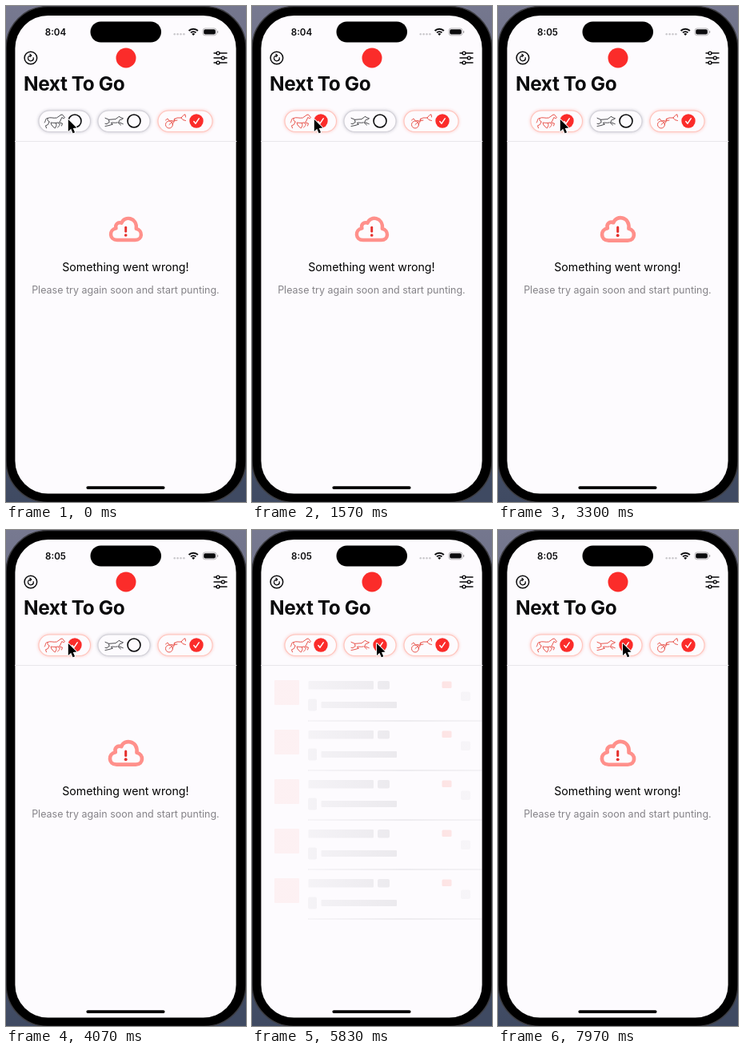
An HTML page with a canvas that plays this animation: 300 px wide and 621 px high, repeating every 8 s.

```html
<!DOCTYPE html>
<html lang="en">
<head>
<meta charset="utf-8">
<title>Next To Go</title>
<style>
  html, body { margin: 0; width: 100%; height: 100%; overflow: hidden; background: #2c2e3b; }
  canvas { display: block; width: 300px; height: 621px; }
</style>
</head>
<body>
<canvas id="stage"></canvas>
<script>
const W = 300, H = 621, LOOP = 8000;
const RED = '#fb2c2a', INK = '#0b0b0d', PAPER = '#fdfbfe';
const FONT = 'Inter, "Liberation Sans", sans-serif';

const canvas = document.getElementById('stage');
const ctx = canvas.getContext('2d');
const dpr = window.devicePixelRatio || 1;
canvas.width = W * dpr;
canvas.height = H * dpr;

// Each load: tap on a chip, then the error comes back.
const loads = [
  { tap: 300, back: 985, shineX: 60, shineAt: 1100, icon: [28.5, 196, 23, 24], tag: [232, 189, 17, 6] },
  { tap: 5150, back: 6000, shineX: 190, shineAt: 5830, icon: [28, 188, 31, 31], tag: [237.5, 189.5, 12, 8.5] }
];

const cloud = new Path2D('M138.5 293.5H162C172 293.5 172 280.5 163.3 278.8C165 263.5 147.5 261.5 144.3 271.3C139 269.5 135.5 273.5 137 278.3C127.5 280 128 293.5 138.5 293.5Z');
const icons = {
  horse: new Path2D('M4 5C7 3 11 5.5 15.5 4.5L20 1.2L22.3 .3L25.5 4.3L24.3 5.3L21.8 4L19.8 8.5L18.5 10.5L22.5 11.5L21.5 14.5M17.5 10.8L19.5 13.5L16.5 16.5M17 10.5C13 11.5 10 10.5 8 10.5L9 13.5L12.5 17.3M6 9.5L4.5 13L1.5 14.3L2.5 17.3M4 5C1 4.5 2 8 .3 10.5M4 5C3.2 7 4.5 8.5 6 9.5M14.5 11L15 14L13.5 17.3'),
  dog: new Path2D('M.5 2.8L5 4.8L13.5 4.2L17 1.5L18.5 .8L19.2 2L23 3.2L21.8 4.4L18.6 5L17.2 8L22.8 10.2M16.5 8.5L20 11.5M15.5 8.5C12 9.5 9 7.5 7.5 9L10 10.5L5.5 12L.5 13M5.5 8L2.5 10.2L.5 9.8M5 4.8L5.5 8'),
  trot: new Path2D('M9.5 13A4.5 4.5 0 1 1 .5 13A4.5 4.5 0 1 1 9.5 13M5 13L10 8.5L15 7.5M.5 7.5L3 5.5L5.5 8.5L9 8M11 6.5L15 4.5L20 4.5L23 1L25 .3L25.5 3.5M20 4.5L22 7L25.5 8M12 5.5L11 9.5L9 12.5')
};
const chips = [
  { x: 41, w: 64.5, icon: 'horse', ix: 48, iy: 135.5, cx: 86, on: t => t >= loads[0].tap },
  { x: 115, w: 65, icon: 'dog', ix: 123.5, iy: 137.5, cx: 160, on: t => t >= loads[1].tap },
  { x: 190, w: 68, icon: 'trot', ix: 199, iy: 135.5, cx: 238, on: () => true }
];

const clamp = v => Math.max(0, Math.min(1, v));
const ease = v => { v = clamp(v); return v * v * (3 - 2 * v); };

function box(x, y, w, h, r, fill) {
  ctx.beginPath();
  ctx.roundRect(x, y, w, h, r);
  if (fill) { ctx.fillStyle = fill; ctx.fill(); }
}

function disc(x, y, r, fill) {
  ctx.beginPath();
  ctx.arc(x, y, r, 0, Math.PI * 2);
  if (fill) { ctx.fillStyle = fill; ctx.fill(); }
}

function line(color, width, ...pts) {
  ctx.beginPath();
  for (let i = 0; i < pts.length; i += 2) ctx.lineTo(pts[i], pts[i + 1]);
  ctx.strokeStyle = color;
  ctx.lineWidth = width;
  ctx.stroke();
}

function text(str, x, y, size, weight, color, align, spacing) {
  ctx.font = `${weight} ${size}px ${FONT}`;
  ctx.letterSpacing = spacing || '0px';
  ctx.textAlign = align || 'left';
  ctx.fillStyle = color;
  ctx.fillText(str, x, y);
}

function drawPhone() {
  const bg = ctx.createLinearGradient(0, 0, 60, H);
  bg.addColorStop(0, '#777990');
  bg.addColorStop(1, '#3f4a62');
  ctx.fillStyle = bg;
  ctx.fillRect(0, 0, W, H);
  box(0, 0.5, 300, 621, 52, '#000');
  ctx.strokeStyle = '#3d3d42';
  ctx.lineWidth = 1.6;
  ctx.stroke();
  box(11.4, 12, 276.2, 598.6, 41, PAPER);
  box(105.5, 19.5, 88.5, 26, 13, '#000');
  box(100.4, 601.2, 98.2, 3.8, 1.9, '#000');
}

function drawStatus(t) {
  text(t < 3000 ? '8:04' : '8:05', 62, 36.7, 11.6, 600, INK, 'center');
  for (let i = 0; i < 4; i++) disc(210.7 + i * 3.9, 35.3, 1.2, '#c9c7cb');
  ctx.strokeStyle = INK;
  ctx.lineCap = 'butt';
  for (const r of [4.6, 8]) {
    ctx.beginPath();
    ctx.arc(234.2, 36.7, r, -Math.PI * 0.75, -Math.PI * 0.25);
    ctx.lineWidth = 1.9;
    ctx.stroke();
  }
  ctx.beginPath();
  ctx.moveTo(234.2, 37);
  ctx.arc(234.2, 37, 2.8, -Math.PI * 0.75, -Math.PI * 0.25);
  ctx.fillStyle = INK;
  ctx.fill();
  box(246, 28, 17, 8.8, 2.8);
  ctx.strokeStyle = '#a7a6a9';
  ctx.lineWidth = 0.8;
  ctx.stroke();
  box(247.2, 29.2, 14.6, 6.4, 1.8, INK);
  box(264, 30.9, 1.2, 3, 0.6, '#a7a6a9');
}

function drawHeader() {
  ctx.lineCap = ctx.lineJoin = 'round';
  disc(30.9, 65, 7.8);
  ctx.strokeStyle = INK;
  ctx.lineWidth = 1.5;
  ctx.stroke();
  ctx.beginPath();
  ctx.arc(30.9, 65.4, 3.4, -0.25, Math.PI * 1.55);
  ctx.lineWidth = 1.2;
  ctx.stroke();
  line(INK, 1.2, 29.9, 60.3, 31.7, 62, 30, 63.7);

  disc(150, 65, 12.5, RED);

  [[59, 265], [65, 271.3], [71, 265]].forEach(([y, x]) => {
    line(INK, 1.4, 260, y, 276, y);
    disc(x, y, 1.9, PAPER);
    ctx.stroke();
  });
  text('Next To Go', 22, 105.7, 24.4, 700, INK, 'left', '-0.4px');
  line('#e9e7eb', 1, 11, 169.5, 288, 169.5);
}

function drawChip(c, t) {
  const on = c.on(t);
  ctx.save();
  ctx.shadowColor = on ? 'rgba(255,70,45,.4)' : 'rgba(50,50,75,.35)';
  ctx.shadowBlur = 4 * dpr;
  box(c.x, 131, c.w, 26.5, 13.25, PAPER);
  ctx.restore();
  ctx.strokeStyle = on ? '#ffc4bc' : '#d3d1d8';
  ctx.lineWidth = 1.1;
  ctx.stroke();

  ctx.save();
  ctx.translate(c.ix, c.iy);
  ctx.strokeStyle = on ? '#e9554d' : '#4b4b4f';
  ctx.lineWidth = 1;
  ctx.stroke(icons[c.icon]);
  ctx.restore();

  if (on) {
    disc(c.cx, 144, 8.7, RED);
    line('#fff', 1.5, c.cx - 3.2, 144.6, c.cx - 1, 147.2, c.cx + 3.2, 140.8);
  } else {
    disc(c.cx, 144, 8);
    ctx.strokeStyle = INK;
    ctx.lineWidth = 1.6;
    ctx.stroke();
  }
}

function shine(rgb, alpha, x) {
  const g = ctx.createLinearGradient(x - 120, 0, x + 120, 0);
  [[0, 0.45], [0.5, 1], [1, 0.45]].forEach(([p, a]) => g.addColorStop(p, `rgba(${rgb},${alpha * a})`));
  return g;
}

function drawSkeleton(t, load, alpha) {
  const x = load.shineX + (t - load.shineAt) * 0.3;
  const grey = shine('110,110,122', 0.13, x);
  const rule = shine('100,100,110', 0.2, x);
  const pink = shine('255,75,60', 0.13, x);
  const tag = shine('255,75,60', 0.17, x);
  const [ix, iy, iw, ih] = load.icon, [tx, ty, tw, th] = load.tag;
  ctx.globalAlpha = alpha;
  for (let i = 0; i < 5; i++) {
    const y = i * 62;
    box(ix, iy + y, iw, ih, 1, pink);
    box(70.5, 189 + y, 81.5, 10.5, 1, grey);
    box(157, 189 + y, 15, 10.5, 2, grey);
    box(70, 211.5 + y, 11, 15, 2, grey);
    box(86.5, 215 + y, 94.5, 8, 1, grey);
    box(tx, ty + y, tw, th, 1.5, tag);
    box(261, 202.5 + y, 12, 11.5, 2, shine('110,110,122', 0.07, x));
    line(rule, 1, 70, 239 + y, 287.5, 239 + y);
  }
  ctx.globalAlpha = 1;
}

function drawError(t, alpha) {
  const peak = t < loads[0].back ? 500 : t < loads[1].back ? 170 : 950;
  const s = 0.99 + 0.03 * Math.cos((t - peak) * Math.PI / 500);
  ctx.globalAlpha = alpha;
  ctx.save();
  ctx.translate(149.7, 281);
  ctx.scale(s, s);
  ctx.translate(-149.7, -281);
  ctx.strokeStyle = '#ff908b';
  ctx.lineWidth = 4.6;
  ctx.stroke(cloud);
  line('#e5302d', 3, 149.7, 277, 149.7, 282.4);
  disc(149.7, 287.2, 1.9, '#e5302d');
  ctx.restore();
  text('Something went wrong!', 149.4, 332, 14.15, 400, '#000', 'center');
  text('Please try again soon and start punting.', 149.4, 359.5, 12.5, 400, '#858388', 'center');
  ctx.globalAlpha = 1;
}

function drawCursor(t) {
  ctx.save();
  ctx.translate(77.8 + 78.2 * ease((t - 4400) / 450), 142);
  ctx.scale(0.93, 0.93);
  ctx.beginPath();
  ctx.moveTo(0, 0);
  [[0, 16], [3.7, 12.7], [6.2, 18.6], [8.9, 17.4], [6.4, 11.7], [11.3, 11.4]].forEach(p => ctx.lineTo(...p));
  ctx.closePath();
  ctx.lineJoin = 'round';
  ctx.strokeStyle = '#fff';
  ctx.lineWidth = 2;
  ctx.stroke();
  ctx.fillStyle = '#000';
  ctx.fill();
  ctx.restore();
}

// The screen stalls twice while the second load is waiting.
function hold(t) {
  if (t >= 5600 && t < 5830) return 5600;
  if (t >= 5830 && t < 6000) return 5830;
  return t;
}

function draw(t) {
  t = hold(t);
  ctx.setTransform(dpr, 0, 0, dpr, 0, 0);
  drawPhone();
  drawStatus(t);
  drawHeader();
  chips.forEach(c => drawChip(c, t));
  const load = t < 4000 ? loads[0] : loads[1];
  const gone = ease((t - load.tap) / 350) * (1 - ease((t - load.back) / 400));
  if (gone > 0) drawSkeleton(t, load, gone);
  if (gone < 1) drawError(t, 1 - gone);
  drawCursor(t);
}

const start = performance.now();
function tick() {
  draw((performance.now() - start) % LOOP);
  requestAnimationFrame(tick);
}
tick();
</script>
</body>
</html>
```
